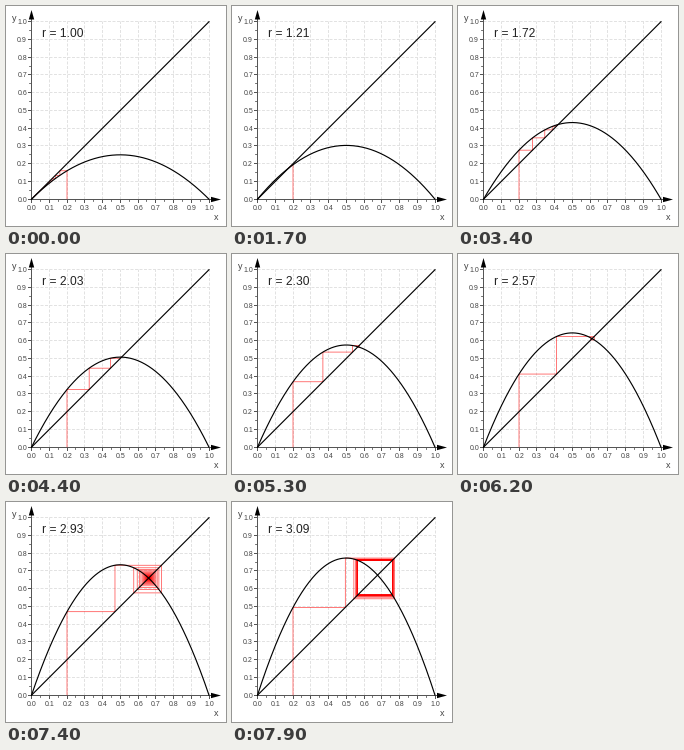
These frames come from a looping animation (220 by 220 pixels, 8000 ms). A matplotlib script:

```python
import numpy as np
import matplotlib.pyplot as plt
from matplotlib.animation import FuncAnimation

SIZE, DPI = 220, 100
PT = 72 / DPI                      # points per pixel
X0, Y0, UNIT = 25.5, 193.2, 177.5  # plot corner and length of one unit
HOLD, FRAMES = 10, 80
START, STEPS = 0.2, 100
GREY, GRID = "#555555", "#e2e2e2"

plt.rcParams["font.family"] = "Liberation Sans"
fig = plt.figure(figsize=(SIZE / DPI, SIZE / DPI), dpi=DPI, facecolor="white")
ax = fig.add_axes([0, 0, 1, 1])
ax.set_xlim(0, SIZE)
ax.set_ylim(SIZE, 0)
ax.axis("off")


def px(x):
    return X0 + UNIT * np.asarray(x)


def py(y):
    return Y0 - UNIT * np.asarray(y)


def crisp(v):
    """Centre of the pixel that holds v."""
    return np.floor(v) + 0.5


def line(x, y, color="black", width=1.0, **kw):
    return ax.plot(x, y, color=color, lw=width * PT, snap=False, **kw)[0]


def label(x, y, s, size, color="#444444", **kw):
    return ax.text(x, y, s, fontsize=size * PT, color=color,
                   va="baseline", **kw)


def draw_axes():
    left, base = crisp(X0), crisp(Y0)
    right, top = crisp(px(1)), crisp(py(1))
    for i in range(11):
        gx, gy = crisp(px(i / 10)), crisp(py(i / 10))
        if i:
            dashed = dict(color=GRID, dashes=(3, 1.5), zorder=1)
            line([gx, gx], [base, top], **dashed)
            line([left, right], [gy, gy], **dashed)
        line([gx, gx], [base, base + 3], GREY)
        line([left - 3, left], [gy, gy], GREY)
        if i < 10:
            mx, my = crisp(px(i / 10 + 0.05)), crisp(py(i / 10 + 0.05))
            line([mx, mx], [base, base + 2], GREY, 0.8)
            line([left - 2, left], [my, my], GREY, 0.8)
        label(gx, 203.8, f"{i / 10:.1f}", 7, ha="center")
        label(21, gy + 2.4, f"{i / 10:.1f}", 7, ha="right")
    line([left, 208], [base, base], GREY, zorder=2)
    line([left, left], [base, 11], GREY, zorder=2)
    ax.fill([215, 205, 205], [base, base - 2.7, base + 2.7], "black",
            lw=0, zorder=5)
    ax.fill([left, left - 2.7, left + 2.7], [4, 13.5, 13.5], "black",
            lw=0, zorder=5)
    label(210, 214, "x", 9, ha="center")
    label(8, 15, "y", 9, ha="center")


def cobweb(r):
    x, xs, ys = START, [START], [0.0]
    for _ in range(STEPS):
        y = r * x * (1 - x)
        xs += [x, y]
        ys += [y, y]
        x = y
    return px(xs), py(ys)


draw_axes()
t = np.linspace(0, 1, 201)
line(px([0, 1]), py([0, 1]), width=1.15, zorder=4)
curve = line([], [], width=1.15, zorder=4)
# separate segments, so that repeated passes build up to full red
web = [line([], [], "red", 0.65, alpha=0.8, zorder=3,
            solid_capstyle="butt") for _ in range(2 * STEPS)]
title = label(36.5, 31, "", 12, "#222222")


def update(frame):
    k = max(0, frame - HOLD)
    r = 1 + 3 * k / 99
    curve.set_data(px(t), py(r * t * (1 - t)))
    xs, ys = cobweb(r)
    for i, seg in enumerate(web):
        seg.set_data(xs[i:i + 2], ys[i:i + 2])
    cents = 100 + 300 * k // 99    # shown value is cut, not rounded
    title.set_text(f"r = {cents / 100:.2f}")
    return [curve, title, *web]


anim = FuncAnimation(fig, update, frames=FRAMES, interval=100,
                     repeat=True, repeat_delay=0, blit=False)
plt.show()
```
